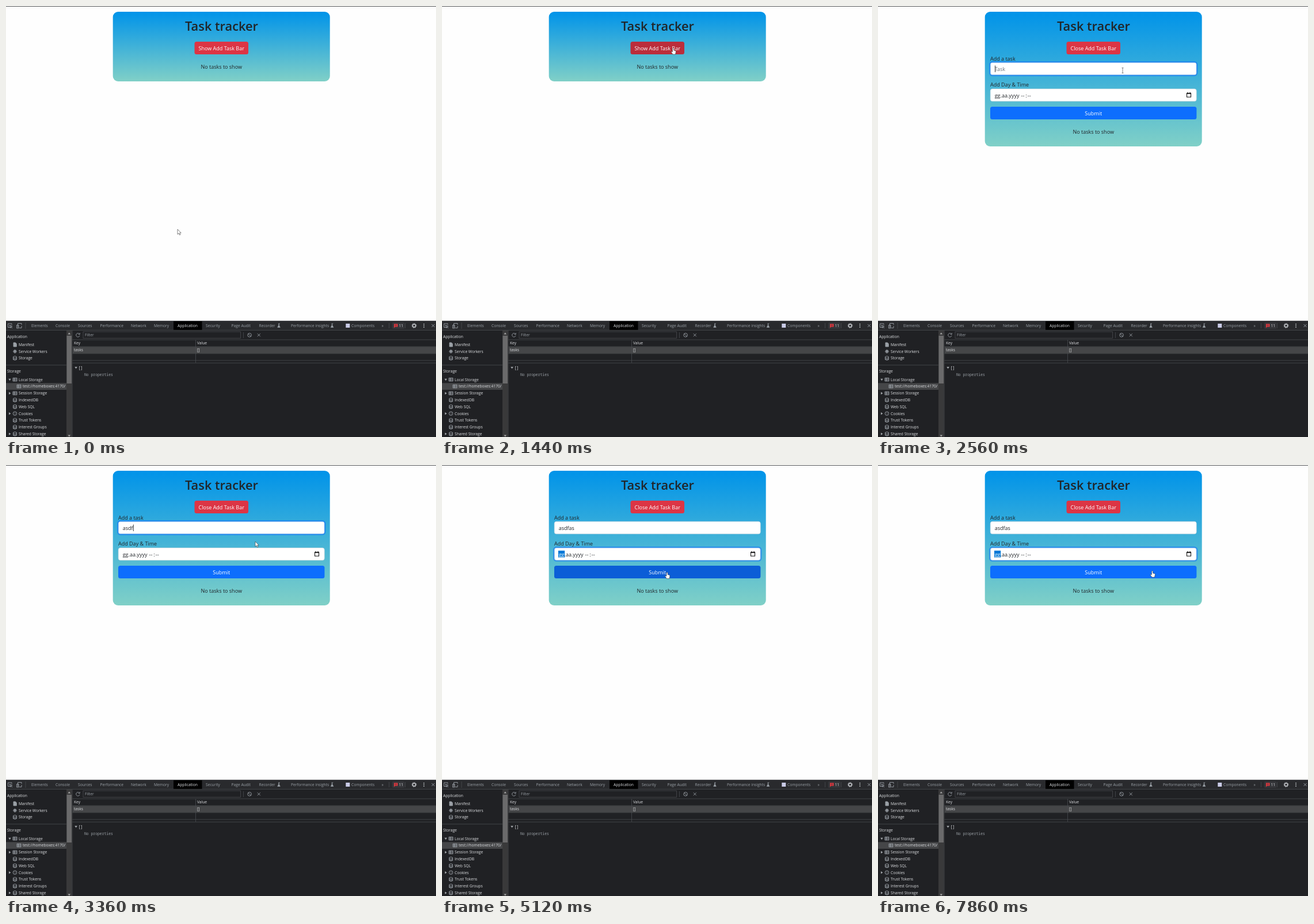
An HTML page that plays this animation: 747x749 px, repeating every 8 s.

```html
<!DOCTYPE html>
<html lang="en">
<head>
<meta charset="utf-8">
<title>Task list demo</title>
<style>
  html, body { margin: 0; width: 100%; height: 100%; overflow: hidden; background: #fefefe; }
  svg { display: block; width: 747px; height: 749px; font: 9px "Open Sans", "Noto Sans", sans-serif; fill: #212529; }
  text { white-space: pre; }
  .mid { text-anchor: middle; }
  .white { fill: #fff; }
  .field { fill: #fff; stroke: #ced4da; stroke-width: .6; }
  .glow { fill: none; stroke: #0d6efd; stroke-opacity: .5; stroke-width: 2.4; }
  .ui { font-size: 6.7px; fill: #dcdee1; }
  .dim { fill: #9aa0a6; }
  .mono { font: 6.4px "Noto Sans Mono", "DejaVu Sans Mono", monospace; }
  .line { fill: none; stroke: #9aa0a6; stroke-width: .9; }
  .rule { fill: none; stroke: #4a4c50; stroke-width: .8; }
  .cursor { fill: #fff; stroke: #333; stroke-width: .6; stroke-linejoin: round; }
</style>
</head>
<body>
<svg viewBox="0 0 747 749">
  <defs>
    <linearGradient id="sky" x2="0" y2="1">
      <stop stop-color="#0093e9"/><stop offset="1" stop-color="#80d0c7"/>
    </linearGradient>
    <filter id="shadow" x="-10%" y="-30%" width="120%" height="180%">
      <feDropShadow dx="0" dy="2" stdDeviation="3" flood-opacity=".35"/>
    </filter>
  </defs>
  <rect width="747" height="749" fill="#fefefe"/>
  <rect width="747" height="1" fill="#55575a"/>

  <rect id="card" x="185.7" y="10" width="377" height="121" rx="9" fill="url(#sky)"/>
  <text class="mid" x="374.5" y="43.3" font-size="21.8" font-weight="600">Task tracker</text>
  <rect id="toggle" x="327.5" y="62" width="93.5" height="22" rx="3.5"/>
  <text id="toggleText" class="mid white" x="374.2" y="76.6"></text>

  <g id="form">
    <text x="195" y="94.8">Add a task</text>
    <rect class="field" x="195.2" y="98.2" width="358" height="21.6" rx="3.5"/>
    <rect id="taskGlow" class="glow" x="194.2" y="97.2" width="360" height="23.6" rx="4.5"/>
    <text id="taskText" x="202.7" y="113"></text>
    <rect id="caret" y="103.5" width=".9" height="11.5"/>
    <text x="195" y="140.3">Add Day &amp; Time</text>
    <rect class="field" x="195.2" y="144" width="358" height="21.6" rx="3.5"/>
    <text x="202.7" y="158.6">gg.aa.yyyy</text>
    <text x="248.5" y="158.6">--</text>
    <text x="256.3" y="158.6">:</text>
    <text x="259.8" y="158.6">--</text>
    <g id="dateFocus">
      <rect class="glow" x="194.2" y="143" width="360" height="23.6" rx="4.5"/>
      <rect x="202" y="148.8" width="11.2" height="12" fill="#0078d7"/>
      <text class="white" x="202.7" y="158.6">gg</text>
    </g>
    <path d="M536.5 151.5h7v6.8h-7zM538 149.8v1.5M542 149.8v1.5M536.5 152.3h7" fill="none" stroke="#111" stroke-width="1.1"/>
    <rect id="submit" x="195" y="175" width="358.4" height="22" rx="3.5"/>
    <text class="mid white" x="374.2" y="189.8">Submit</text>
  </g>
  <text id="empty" class="mid" x="374.2">No tasks to show</text>

  <g id="tools">
    <rect y="547" width="747" height="202" fill="#202124"/>
    <rect y="547" width="747" height="16.5" fill="#292a2d"/>
    <rect x="291" y="547.5" width="49.5" height="15.5" fill="#000"/>
    <path class="rule" d="M0 547.4H747M0 563.5H747M34 550V561M665.5 551V560M693.5 551V560"/>
    <path class="line" d="M7 558.5H3.5V552H10V554M6 554.5 11 556.5 8.7 557.4 8 559.6ZM8.7 557.4 11 560M20.5 559V551.5H27V554M18.5 554.5H22V560H18.5ZM23 559.5H27V556"/>
    <rect x="590.3" y="552" width="7" height="7" fill="#c9cbe6"/>
    <path d="M473 552h3M473.8 552v2.5l-2 4h4.4l-2-4V552M565.5 552h3M566.3 552v2.5l-2 4h4.4l-2-4V552" fill="#9aa0a6" stroke="#9aa0a6" stroke-width=".7"/>
    <rect x="671" y="550" width="21" height="11" rx="1.5" fill="#35363a"/>
    <path d="M674 552.5h6.5v5h-4.5l-2 2z" fill="#e8373e"/>
    <path d="M675.3 554.2h3.8M675.3 555.8h3.8" stroke="#35363a" stroke-width=".6"/>
    <circle cx="709" cy="555.5" r="2.6" fill="none" stroke="#c4c7cb" stroke-width="1.5"/>
    <circle cx="709" cy="555.5" r="3.9" fill="none" stroke="#c4c7cb" stroke-dasharray="1.5 1.56"/>
    <path d="M726 552v7" stroke="#c4c7cb" stroke-width="1.5" stroke-dasharray="1.5 1.2"/>
    <path class="line" d="m739.5 553 5 5m0-5-5 5"/>

    <rect y="655.3" width="105" height="11.6" fill="#454648"/>
    <rect x="105" y="564" width="9.5" height="185" fill="#39393a"/>
    <rect x="105.5" y="573" width="8.5" height="83" fill="#6a6a6b"/>
    <path d="M107.5 570.5h4.6l-2.3-3zM107.5 745.5h4.6l-2.3 3z" fill="#a8a8a8"/>
    <path class="rule" d="M0 624H105M115 564V749M115 580H747M115 592H747M115 604H747M115 616H747M115 620.4H747M329.5 580V620M412.5 567V577"/>
    <rect x="115.5" y="592.3" width="631.5" height="11.5" fill="#454648"/>
    <path class="rule" d="M329.5 592V604" stroke="#606266"/>
    <rect class="rule" x="134" y="566" width="273.5" height="11.3"/>
    <path class="line" d="M127.6 570.2A3.2 3.2 0 1 0 128 572.8M128.2 568.2v2.4h-2.4M436.8 569.3l5 5m0-5-5 5M420.7 569.5l4.8 4.8"/>
    <circle class="line" cx="423.1" cy="571.9" r="3.3"/>
    <path d="M119.3 627h4.6l-2.3 3.6z" fill="#a0a4a8"/>
    <text class="mono" x="125.7" y="631" fill="#e8eaed">[]</text>
    <text class="mono" x="136" y="643.2" fill="#9aa0a6" font-style="italic">No properties</text>
  </g>

  <g id="dialog">
    <path d="M242 0H507V54q0 2-2 2H244q-2 0-2-2Z" fill="#292a2d" filter="url(#shadow)"/>
    <rect x="382" width="2" height="1" fill="#bbb"/>
    <text class="ui" x="251.3" y="15.4" style="fill:#e8eaed">You cant input a date-time before now, try again.</text>
    <rect x="454.6" y="27.6" width="42.4" height="19" rx="2.5" fill="#292a2d" stroke="#5f8fd6" stroke-width="1.3"/>
    <rect x="456" y="29" width="39.6" height="16.2" rx="1.5" fill="#8ab4f8"/>
    <text class="mid" x="475.7" y="39.6" font-size="6.7">Tamam</text>
  </g>

  <g id="cursor" class="cursor">
    <path id="arrow" d="M0 0V8.8L2.1 6.9 3.5 10 5 9.3 3.6 6.3H6.2Z"/>
    <path id="hand" d="M-1.1.8Q0-.7 1.1.8V4L4 4.7Q5.1 5.1 4.9 6.6L4 11H-.6L-3.2 7.2Q-3.6 5.8-2.4 5.9L-1.1 6.8Z"/>
    <path id="beam" d="M-1.5-4.5H1.5M0-4.5V4.5M-1.5 4.5H1.5" fill="none"/>
  </g>
</svg>
<script>
const $ = id => document.getElementById(id);
const make = (tag, attrs, text = "") => {
  const node = document.createElementNS($("tools").namespaceURI, tag);
  for (const key in attrs) node.setAttribute(key, attrs[key]);
  node.textContent = text;
  $("tools").append(node);
};
const label = (x, y, text, dim) => make("text", { x, y: y + 2.4, class: dim ? "ui dim" : "ui" }, text);

// Developer panel
[[44, "Elements"], [86, "Console"], [125, "Sources"], [163.5, "Performance"], [217, "Network"],
 [257, "Memory"], [347, "Security"], [391.5, "Page Audit"], [439.5, "Recorder"],
 [495, "Performance insights"], [600, "Components"], [652.5, "»"]]
  .forEach(([x, name]) => label(x, 555.6, name, true));
[[298, 555.6, "Application"], [682.5, 555.6, "11"], [2, 574.3, "Application"], [2, 635, "Storage"],
 [118, 586, "Key"], [332, 586, "Value"], [118, 598, "tasks"], [332, 598, "[]"]]
  .forEach(args => label(...args));
label(137, 572, "Filter", true);

const icons = {
  file: "M-2.5-3.5H1L2.8-1.5V3.5H-2.5Z",
  gear: "M-3.6 0H3.6M0-3.6V3.6M-2.5-2.5 2.5 2.5M2.5-2.5-2.5 2.5M-2 0A2 2 0 1 0 2 0 2 2 0 1 0-2 0",
  base: "M-3-2.5Q0-4.5 3-2.5V2.5Q0 4.5-3 2.5ZM-3-1Q0 .8 3-1M-3 1.2Q0 3 3 1.2",
  grid: "M-3.5-2.8H3.5V2.8H-3.5ZM-3.5-1H3.5M-3.5 1H3.5M-1-2.8V2.8",
  cookie: "M-3.3 0A3.3 3.3 0 1 0 3.3 0 3.3 3.3 0 1 0-3.3 0M-1.4-1h1M.5.8h1M-1 1.6h.8M1-1.4h.8"
};
const item = (y, name, icon, arrow, x = 22) => {
  label(x, y, name);
  const fill = icon == "file" ? "#9aa0a6" : "none";
  make("path", { class: "line", d: icons[icon], transform: `translate(${x - 6.5} ${y})`, style: `fill:${fill}` });
  if (arrow) make("path", {
    d: arrow == "down" ? "M-2.2-1.5H2.2L0 2Z" : "M-1.5-2.2V2.2L2 0Z",
    transform: `translate(6.5 ${y})`, fill: "#a0a4a8"
  });
};
item(588.5, "Manifest", "file");
item(600.3, "Service Workers", "gear");
item(612, "Storage", "base");
item(649.2, "Local Storage", "grid", "down");
item(661, "test://homeboxes:4170/", "grid", "", 29);
item(673, "Session Storage", "grid", "right");
item(684.7, "IndexedDB", "base");
item(696.4, "Web SQL", "base");
item(708.2, "Cookies", "cookie", "right");
item(720, "Trust Tokens", "base");
item(731.8, "Interest Groups", "base");
item(743.6, "Shared Storage", "base", "right");

// Pointer path: time, x, y
const path = [
  [0, 298, 388], [160, 300, 350], [480, 355, 170], [800, 401.5, 73], [1760, 401.5, 73],
  [2080, 405, 209], [2240, 407, 194], [2400, 415, 150], [2560, 425, 112], [2880, 428, 112],
  [3200, 432, 126], [3360, 433, 133], [3840, 410, 190], [4160, 385, 160], [4480, 384, 155],
  [4960, 390, 184], [5120, 391, 186.5], [5780, 391, 187], [5940, 410, 250], [6100, 440, 315],
  [6420, 471, 184], [6900, 476, 36], [7220, 476, 36], [7700, 476.5, 184], [8000, 476.5, 184]
];
const LOOP = 8000, STEP = 160, ALERT = 5780, ALERT_END = 7220;

function pointer(t) {
  const i = path.findIndex(p => p[0] > t);
  const [t0, x0, y0] = path[i - 1], [t1, x1, y1] = path[i];
  const k = (t - t0) / (t1 - t0);
  return [x0 + (x1 - x0) * k, y0 + (y1 - y0) * k];
}
const between = (v, a, b) => v >= a && v < b;
const show = (id, on) => { $(id).style.display = on ? "" : "none"; };

// The picture advances in steps and rests before the alert.
const snap = t => t < ALERT
  ? Math.min(Math.floor(t / STEP) * STEP, 5120)
  : ALERT + Math.floor((t - ALERT) / STEP) * STEP;

function render(t) {
  const [x, y] = pointer(t);
  const open = t >= 960 && !between(t, 1440, 1760);
  const alerting = between(t, ALERT, ALERT_END);
  const onToggle = between(x, 328, 421) && between(y, 62, 84) && t < 2000;
  const onSubmit = open && between(x, 195, 553) && between(y, 175, 197);
  const onField = open && between(x, 195, 553) && (between(y, 98, 120) || between(y, 144, 166)) && t < ALERT;
  const typed = "asdfas".slice(0, Math.max(0, (t - 2720) / STEP));
  const typing = between(t, 2560, 4160);

  show("form", open);
  $("card").setAttribute("height", open ? 234 : 121);
  $("empty").setAttribute("y", open ? 222 : 108.8);
  $("toggle").setAttribute("fill", onToggle ? "#bb2d3b" : "#dc3545");
  $("toggleText").textContent = (open ? "Close" : "Show") + " Add Task Bar";
  $("submit").setAttribute("fill", alerting || onSubmit && t < ALERT ? "#0b5ed7" : "#0d6efd");

  $("taskText").textContent = typed || "Task";
  $("taskText").style.fill = typed ? "" : "#6c757d";
  show("taskGlow", typing);
  show("caret", typing);
  $("caret").setAttribute("x", 203 + (typed && open ? $("taskText").getComputedTextLength() : 0));
  show("dateFocus", t >= 4160);
  show("dialog", alerting);

  const hand = alerting ? y > 56 : onToggle || onSubmit;
  show("hand", hand);
  show("beam", !hand && onField);
  show("arrow", !hand && !onField);
  $("cursor").setAttribute("transform", `translate(${x} ${y})`);
}

const start = performance.now();
function tick() {
  render(snap((performance.now() - start) % LOOP));
  requestAnimationFrame(tick);
}
tick();
</script>
</body>
</html>
```
